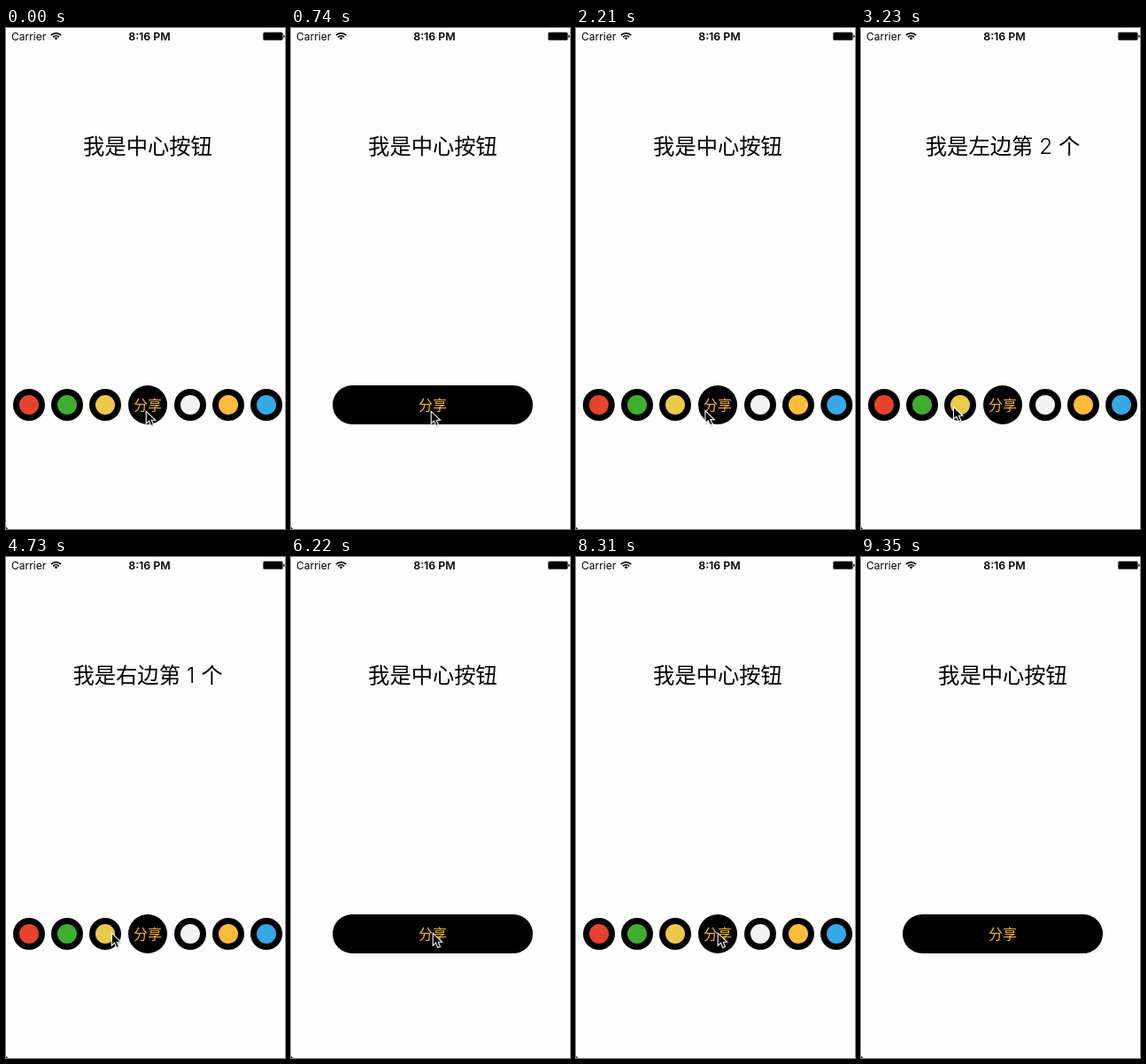
An HTML page for the animation above (9.65 s loop, 315 by 565 pixels).

```html
<!DOCTYPE html>
<html lang="zh">
<head>
<meta charset="utf-8">
<title>Share menu</title>
<style>
  html, body { margin: 0; width: 100%; height: 100%; overflow: hidden; background: #fefefe; }
  svg { display: block; width: 315px; height: 565px; }
  text { text-anchor: middle; font-family: Inter, "Noto Sans CJK SC", "Noto Sans CJK", sans-serif; font-weight: 350; }
  .status { font: 12px Inter, sans-serif; }
</style>
</head>
<body>
<svg viewBox="0 0 315 565">
  <rect width="315" height="565" fill="#fefefe"/>
  <path d="M0 562.5V565H2.5Z" fill="#333"/>

  <text class="status" x="6" y="14" style="text-anchor:start">Carrier</text>
  <g fill="none" stroke="#000" stroke-width="1.7">
    <path d="M50.8 8.1A8.2 8.2 0 0 1 62.2 8.1M53 10.3A5 5 0 0 1 60 10.3"/>
    <path d="M54.6 11.5A2.7 2.7 0 0 1 58.4 11.5L56.5 13.6Z" fill="#000" stroke="none"/>
  </g>
  <text class="status" x="162" y="14" style="font-weight:600;font-size:12.4px">8:16 PM</text>
  <rect x="290.4" y="4.9" width="22" height="8.8" rx="1.5" stroke="#555" stroke-width=".6"/>
  <path d="M313.3 7.7q1.5 .3 1.5 1.7t-1.5 1.7Z"/>

  <text id="title" x="160" y="141.6" font-size="24.3"></text>
  <g id="icons"></g>
  <rect id="pill" y="403" height="44" rx="22"/>
  <text x="160" y="431" font-size="16" fill="#f5b62e">分享</text>

  <g id="cursor">
    <path d="M.5 1.5V16.5L4 13.3 6.3 18.5 9.1 17.3 6.8 12.2H11.5Z" opacity=".18"/>
    <path d="M.2 .2V14.2L3.5 11.2 5.8 16.6 8.5 15.4 6.2 10.2H10.6Z" stroke="#fff" stroke-width="1.1"/>
  </g>
</svg>
<script>
// All times below are counted in beats
const BEATS = 65, BEAT = 9650 / BEATS, MID = 160;

// The menu starts open; every toggle closes or reopens it
const toggles = [-20, 1, 6, 38, 46.1, 59];

// Buttons the pointer visits: arrival beat, button (negative is left, 0 is the middle)
const stops = [
  [-2, 0], [14, 0], [17, -1], [20, -2], [26, 1], [29, 2],
  [30, 1], [32.4, -1], [35, -2], [37, 0], [BEATS, 0]
];
const PRESS = 2; // beats from arrival to the new title

const $ = id => document.getElementById(id);
const clamp = v => Math.min(1, Math.max(0, v));
const smooth = p => p * p * (3 - 2 * p);
const overshoot = p => 1 + 2.7 * (p - 1) ** 3 + 1.7 * (p - 1) ** 2;
const offset = b => b && Math.sign(b) * (5 + 43 * Math.abs(b));

const colors = ["#e6432d", "#3fae2f", "#ecc94b", "", "#f2f2f2", "#fcbd3c", "#35a8e6"];
const icons = [];
for (const rank of [3, 2, 1]) for (const side of [-1, 1]) {
  const el = document.createElementNS("http://www.w3.org/2000/svg", "g");
  el.innerHTML = `<circle r="18"/><circle r="11" fill="${colors[3 + side * rank]}"/>`;
  $("icons").append(el);
  icons.push({ el, rank, side });
}

function titleAt(n) {
  const b = stops.findLast(s => s[0] + PRESS <= n)[1];
  return b ? `我是${b < 0 ? "左" : "右"}边第 ${Math.abs(b)} 个` : "我是中心按钮";
}

function pointerAt(n) {
  const i = stops.findIndex(s => s[0] > n);
  const [n0, from] = stops[i - 1], [n1, to] = stops[i];
  const x = MID + offset(from) + (offset(to) - offset(from)) * smooth((n - n0) / (n1 - n0));
  const drop = 8 * (1 - clamp((n - 14) / 13));
  const exit = 150 * clamp((n - 59) / 3);
  return [x - drop / 4, 424 + drop + exit];
}

// Icons slide in together, but come out pair by pair from behind the previous pair
function iconAt(rank, open, age) {
  if (!open) {
    const p = clamp(age / 2.5);
    return [offset(rank) * (1 - smooth(p)), p < 1 ? 1 : 0];
  }
  const p = clamp((age - 4.93) / 2.1 - rank + 2), from = offset(rank - 1);
  return [from + (offset(rank) - from) * overshoot(p), clamp(p * 5)];
}

function draw(n) {
  const i = toggles.findLastIndex(b => b <= n);
  const open = i % 2 === 0, age = n - toggles[i];
  const half = 22 + 91 * smooth(clamp(open ? 1 - age / 2.7 : age / 2 - 1));
  $("pill").setAttribute("x", MID - half);
  $("pill").setAttribute("width", 2 * half);
  for (const { el, rank, side } of icons) {
    const [x, alpha] = iconAt(rank, open, age);
    el.setAttribute("transform", `translate(${MID + side * x} 425)`);
    el.setAttribute("opacity", alpha);
  }
  $("title").textContent = titleAt(n);
  $("cursor").setAttribute("transform", `translate(${pointerAt(n)})`);
}

const begin = performance.now();
function tick() {
  draw(Math.floor((performance.now() - begin + 40) / BEAT) % BEATS);
  requestAnimationFrame(tick);
}
tick();
</script>
</body>
</html>
```
